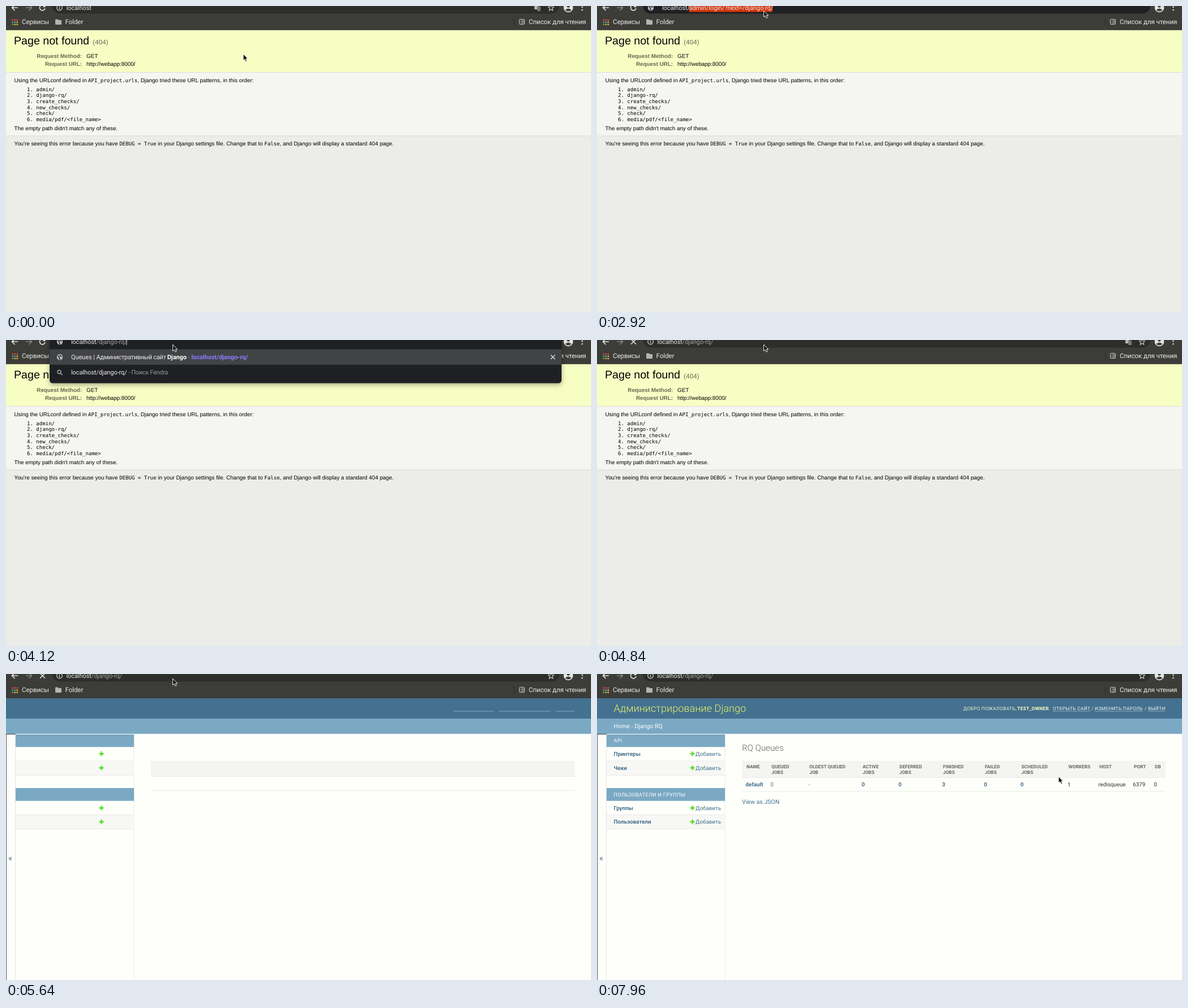
Recreate the animation shown at these times as an HTML page. Size 1033 by 542 pixels, loop 8 s.

```html
<!DOCTYPE html>
<html lang="ru">
<head>
<meta charset="utf-8">
<title>Django RQ</title>
<style>
html, body { margin: 0; width: 100%; height: 100%; overflow: hidden; background: #ecece9; }
svg { display: block; width: 1033px; height: 542px; }
text { white-space: pre; text-rendering: geometricPrecision; }
.bar { font: 11.6px Roboto, sans-serif; letter-spacing: -.1px; }
.url { font: 11px Roboto, sans-serif; letter-spacing: -.08px; }
.ru { letter-spacing: -.31px; }
.page { font: 9.84px "Liberation Sans", Arial, sans-serif; }
.mono { font: 9.06px "DejaVu Sans Mono", monospace; }
.admin { font: 9.82px Roboto, sans-serif; }
.crumb { font: 10.57px Roboto, sans-serif; }
.caps { font: 9.06px Roboto, sans-serif; letter-spacing: .38px; }
.tools { font: 8.3px Roboto, sans-serif; letter-spacing: .34px; }
.head { font: bold 8.3px Roboto, sans-serif; }
.b { font-weight: bold; }
</style>
</head>
<body>
<svg id="stage" viewBox="0 0 1033 542"></svg>
<script>
const BLUE = '#44718f', SKY = '#7ba9c4', DARK = '#1f2023', VIOLET = '#8c7bfa', HINT = '#95979b', PICK = '#d4340d';

const rect = (x, y, w, h, fill, more = '') =>
  `<rect x="${x}" y="${y}" width="${w}" height="${h}" fill="${fill}" ${more}/>`;
const text = (cls, x, y, str, fill, more = '') =>
  `<text class="${cls}" x="${x}" y="${y}" fill="${fill}" ${more}>${str}</text>`;
const span = (str, fill, cls = '') => `<tspan fill="${fill}" class="${cls}">${str}</tspan>`;
const line = (d, color, width = 1.5) =>
  `<path d="${d}" fill="none" stroke="${color}" stroke-width="${width}"/>`;
const dot = (x, y, r, fill) => `<circle cx="${x}" cy="${y}" r="${r}" fill="${fill}"/>`;
const group = (id, body) => `<g id="${id}">${body}</g>`;

const globe = (x, y) => dot(x, y, 5.2, '#bfc1c4') +
  line(`M${x - 4} ${y - 2}q3 0 3 3t2 3M${x} ${y - 4}q0 3 4 3`, DARK, 1.5);
const lens = (x, y) => `<circle cx="${x - 1}" cy="${y - 1}" r="3" fill="none" stroke="#b0b2b5" stroke-width="1.3"/>` +
  line(`M${x + 1} ${y + 1}l3.5 3.5`, '#b0b2b5', 1.5);
const info = `<circle cx="94.5" cy="3" r="4.8" fill="none" stroke="#d4d4d0" stroke-width="1.2"/>` +
  line('M94.5 2v4M94.5 0v1.2', '#d4d4d0', 1.3);

function debugPage() {
  const urls = ['admin/', 'django-rq/', 'create_checks/', 'new_checks/', 'check/', 'media/pdf/&lt;file_name&gt;'];
  const ink = '#000', right = 'text-anchor="end"';
  const code = s => span(s, ink, 'mono');
  return rect(0, 42, 1033, 500, '#ecece9') + rect(0, 42, 1033, 75.5, '#f7fec4') +
    rect(0, 117, 1033, 113, '#f5f5f2') +
    rect(0, 117, 1033, 1, '#dcdcd6') + rect(0, 229.5, 1033, 1, '#dcdcd8') +
    text('page', 14, 68, 'Page not found', ink, 'style="font-size:19.63px"') +
    text('page', 153, 68, '(404)', '#6b6e56', 'style="font-size:11.78px"') +
    text('page b', 134, 91.5, 'Request Method:', '#666850', right) + text('page', 142, 91.5, 'GET', ink) +
    text('page b', 134, 106, 'Request URL:', '#666850', right) +
    text('page', 142, 106, 'http://webapp:8000/', ink) +
    text('page', 14.5, 135, `Using the URLconf defined in ${code('API_project.urls')}, Django tried these URL patterns, in this order:`, ink) +
    urls.map((u, i) => text('mono', 37, 150.7 + i * 10.6, `${i + 1}. ${u}`, ink)).join('') +
    text('page', 14.5, 219.5, "The empty path didn't match any of these.", ink) +
    text('page', 14.5, 247, `You're seeing this error because you have ${code('DEBUG = True')} in your Django settings file. Change that to ${code('False')}, and Django will display a standard 404 page.`, ink);
}

const rowTops = [129, 154, 225, 249.5];

function adminFrame() {
  const plus = y => line(`M164.5 ${y}h8M168.5 ${y - 4}v8`, '#52df24', 2.4);
  return rect(0, 42, 1033, 500, '#fefffb') + rect(0, 42, 1033, 37, BLUE) + rect(0, 79, 1033, 27, SKY) +
    rect(0, 106, 1, 436, '#555') + rect(0, 106, 17, 1.2, '#555') +
    rect(16, 107, 1, 435, '#e4e4e1') + rect(225.5, 106, 1, 436, '#e9e9e6') +
    rect(17, 107, 209, 22.3, SKY) + rect(17, 202, 209, 22.7, SKY) +
    rect(17, 154, 209, 25, '#f7f8f5') + rect(17, 249.5, 209, 25, '#f7f8f5') +
    [153.5, 179, 249, 274].map(y => rect(17, y, 209, 1, '#eaebe8')).join('') +
    rowTops.map(y => plus(y + 12.3)).join('') +
    text('admin', 4, 331, '«', BLUE, 'style="font-size:15px"');
}

const underline = (x1, x2) => rect(x1, 65.6, x2 - x1, .9, '#8eadc0');

const adminBlank = () => underline(790, 861) + underline(870, 962) + underline(971, 1004) +
  rect(256, 154, 748, 27.5, '#f4f5f2') + rect(256, 181, 748, 1, '#eaebe8') + rect(256, 206, 748, 1, '#eaebe8');

function adminText() {
  const columns = [
    [264, 'NAME', 'default'], [308, 'QUEUED JOBS', '0'], [375, 'OLDEST QUEUED|JOB', '-'],
    [469, 'ACTIVE JOBS', '0'], [534, 'DEFERRED JOBS', '0'], [611, 'FINISHED JOBS', '3'],
    [685, 'FAILED JOBS', '0'], [749.5, 'SCHEDULED JOBS', '0'], [832.5, 'WORKERS', '1'],
    [887, 'HOST', 'redisqueue'], [948, 'PORT', '6379'], [985, 'DB', '0']];
  const split = s => s.split(s.includes('|') ? '|' : ' ');
  const table = columns.map(([x, title, value], i) =>
    split(title).map((s, n) => text('head', x, 166.5 + n * 10, s, '#666')).join('') +
    text(i && (i < 3 || i > 8) ? 'admin' : 'admin b', x - 1.7, 198.5, value, i > 8 ? '#333' : BLUE)).join('');
  const names = ['Принтеры', 'Чеки', 'Группы', 'Пользователи'];
  const tools = [[647, 'ДОБРО ПОЖАЛОВАТЬ,', '#f4f6d6'], [805, 'ОТКРЫТЬ САЙТ', '#f2f5f5'], [873, '/', '#f4f6d6'],
    [879, 'ИЗМЕНИТЬ ПАРОЛЬ', '#f2f5f5'], [967, '/', '#f4f6d6'], [973, 'ВЫЙТИ', '#f2f5f5']];
  return text('admin', 29.5, 66.7, 'Администрирование Django', '#e9f06a', 'style="font-size:18.12px;font-weight:300"') +
    tools.map(([x, s, c]) => text('tools', x, 63.5, s, c)).join('') +
    text('tools', 742, 63.5, span('TEST_OWNER', '#fdffc4', 'b') + '.', '#f4f6d6') +
    underline(805, 871) + underline(879, 964) + underline(973, 1003.5) +
    text('crumb', 29.5, 96, `Home ${span('›', '#d3e3ec')} Django RQ`, '#fff') +
    text('caps', 29.5, 121.3, 'API', '#fff') + text('caps', 29.5, 216.5, 'ПОЛЬЗОВАТЕЛИ И ГРУППЫ', '#fff') +
    names.map((s, i) => text('admin b', 29.5, rowTops[i] + 15.7, s, BLUE) +
      text('admin', 174, rowTops[i] + 15.7, 'Добавить', BLUE)).join('') +
    text('admin', 256, 135.7, 'RQ Queues', '#666', 'style="font-size:15.1px;font-weight:300"') +
    rect(256, 154, 748, 29, '#f4f5f2') + rect(256, 183, 748, 1, '#eaebe8') + rect(256, 207.5, 748, 1, '#eaebe8') +
    table + text('crumb', 256, 230, 'View as JSON', BLUE);
}

function toolbar() {
  const light = '#e4e4e0';
  const red = '#d94b3d', green = '#4fae5b', yellow = '#e0b83c';
  const colors = [red, red, red, green, '#6b8fd6', yellow, green, yellow, yellow];
  const apps = colors.map((c, i) => rect(10.5 + i % 3 * 4, 23.5 + (i / 3 | 0) * 4, 2.5, 2.5, c)).join('');
  return rect(0, 0, 1033, 42.5, '#3c3c39') + rect(0, 41.5, 1033, 1, '#31312f') +
    rect(81, -15, 896, 28.5, '#2d2e2b', 'id="pill" rx="14"') +
    line('M21 3h-10M15.5-2l-5 5l5 5', light, 1.7) + line('M35 3h10M40.5-2l5 5l-5 5', '#82827e', 1.7) +
    group('reload', line('M67.5-.5A4.8 4.8 0 1 0 69 4', light, 1.6) + `<path d="M69.5-3v5h-5z" fill="${light}"/>`) +
    group('stop', line('M60-1.5l9 9M69-1.5l-9 9', light, 1.6)) +
    group('translate', rect(933, -2, 7, 8, '#b9bab6', 'rx="1"') + rect(938, 1, 6, 8, '#777975', 'rx="1"')) +
    group('star', line('M962.5-2l1.5 3.5l3.5.3l-2.7 2.5l.9 3.7l-3.2-2l-3.2 2l.9-3.7l-2.7-2.5l3.5-.3z', '#cfcfcb', 1.1)) +
    dot(993, 3, 8.3, light) + dot(993, 0, 2.7, '#3c3c39') +
    `<path d="M987.5 7q5.5-5 11 0q-5.5 5-11 0" fill="#3c3c39"/>` +
    dot(1017.5, 2, 1.3, light) + dot(1017.5, 7, 1.3, light) +
    apps + text('bar', 28, 32, 'Сервисы', '#e9e9e5') +
    `<path d="M87 24.5q0-1 1-1h3.5l1.5 1.5h4q1 0 1 1v6q0 1-1 1h-9q-1 0-1-1z" fill="#b4b5b1"/>` +
    text('bar', 104.5, 32, 'Folder', '#e9e9e5') + rect(897, 22, 1, 12, '#2a2a28') +
    rect(906.5, 23.5, 9, 9, 'none', 'rx="1" stroke="#cfcfcb"') +
    line('M908.5 26h1M910.5 26h4M908.5 28h1M910.5 28h4M908.5 30.5h1M910.5 30.5h4', '#cfcfcb', 1) +
    text('bar', 923, 32, 'Список для чтения', '#e9e9e5');
}

// Each suggestion: icon painter and its styled text
function dropdown(id, rows) {
  const bottom = 22 + rows.length * 27.3;
  return group(id,
    `<path d="M77-20H981V${bottom - 6}q0 6-6 6H83q-6 0-6-6z" fill="${DARK}" style="filter:drop-shadow(0 3px 4px #0005)"/>` +
    rect(77, 16.5, 904, 27.3, '#424347') + line('M962 26.5l7.5 7.5M969.5 26.5l-7.5 7.5', '#d8d8d8', 1.5) +
    rows.map(([icon, s], i) => icon(95, 30.2 + i * 27.3) +
      text('url', 115, 34 + i * 27.3, s, '#eeeeef')).join(''));
}

const ru = s => `<tspan class="ru">${s}</tspan>`;
const link = (bold, rest = '') => span(bold, VIOLET, 'b') + span(rest, VIOLET);
const dash = span(' - ', HINT);
const search = span(' - Поиск Fendra', HINT, 'ru');
const site = ru('Административный сайт ');
const adminTitle = ru('Администрирование сайта | ') + site + 'Django' + dash;
const longList = [
  [globe, adminTitle + link('localhost/', 'admin/login/?next=/django-rq/')],
  [lens, 'localhost/' + search],
  ...['phpmyadmin', 'wordpress', 'index.php'].map(s => [lens, 'localhost/' + span(s, '#fff', 'b')]),
  [globe, adminTitle + link('localhost/', 'admin/')],
  [globe, link('localhost')],
  [globe, `Queues | ${site}Django${dash}${link('localhost/', 'django-rq/')}`]];
const shortList = [
  [globe, `Queues | ${site}${span('Django', '#fff', 'b')}${dash}${link('localhost/django-rq/')}`],
  [lens, 'localhost/django-rq/' + search]];

function address(t) {
  const put = (x, s) => text('url', x, 7, s, '#e6e6e4');
  const caret = x => rect(x, 0, 1, 9, '#ddd');
  const path = 'localhost' + span('/django-rq/', '#a2a39f');
  if (t < 1520) return info + put(106.5, 'localhost');
  if (t < 2040) return info + rect(106, 0, 46, 10.5, PICK) + put(106.5, 'localhost');
  if (t < 2880) return info + put(106.5, 'localhost') + (t < 2560 ? caret(151) : '');
  if (t < 2920) return globe(95, 3) + put(115, 'localhost/') + caret(162);
  if (t < 4080) return globe(95, 3) + rect(162.5, 0, 147.5, 10.5, PICK) +
    put(115, 'localhost/') + put(162.5, 'admin/login/?next=/django-rq/');
  if (t < 4840) return globe(95, 3) + put(115, path) + (t < 4480 ? caret(212.5) : '');
  return info + put(106.5, path);
}

const $ = id => document.getElementById(id);
$('stage').innerHTML = group('debug', debugPage()) +
  group('admin', adminFrame() + group('blank', adminBlank()) + group('ready', adminText())) +
  toolbar() + dropdown('long', longList) + dropdown('short', shortList) + group('address', '') +
  '<path id="cursor" d="M0 0V11.5L2.6 9.2L4.5 13.3L6.5 12.4L4.7 8.5H8z" fill="#111" stroke="#fff" stroke-width=".9"/>';

// start, end, destination
const moves = [[120, 920, 318, 10], [960, 1120, 294.5, 8], [6240, 6840, 523, 137],
  [7120, 7520, 622, 200], [7760, 7960, 815, 181.5]];

function pointer(t) {
  let x = 419, y = 85;
  for (const [a, b, toX, toY] of moves) {
    const k = Math.min(1, Math.max(0, (t - a) / (b - a)));
    const e = k * k * (3 - 2 * k);
    x += (toX - x) * e;
    y += (toY - y) * e;
  }
  return `translate(${x} ${y})`;
}

const show = (id, on) => $(id).style.display = on ? '' : 'none';
let shown = '';

function draw(now) {
  const t = Math.floor(now % 8000 / 40) * 40;
  const within = (a, b) => t >= a && t < b;
  show('debug', t < 5640);
  show('admin', t >= 5640);
  show('blank', t < 5760);
  show('ready', t >= 5760);
  show('long', within(3040, 4120));
  show('short', within(4120, 4840));
  show('stop', within(4840, 5760));
  show('reload', !within(4840, 5760));
  show('translate', t < 1520 || within(4840, 5160));
  show('star', !within(2880, 4840));
  $('pill').setAttribute('fill', within(1520, 4840) ? DARK : '#2d2e2b');
  const next = address(t);
  if (next !== shown) $('address').innerHTML = shown = next;
  $('cursor').setAttribute('transform', pointer(t));
}

const start = performance.now();
function tick() {
  draw(performance.now() - start);
  requestAnimationFrame(tick);
}
tick();
</script>
</body>
</html>
```
